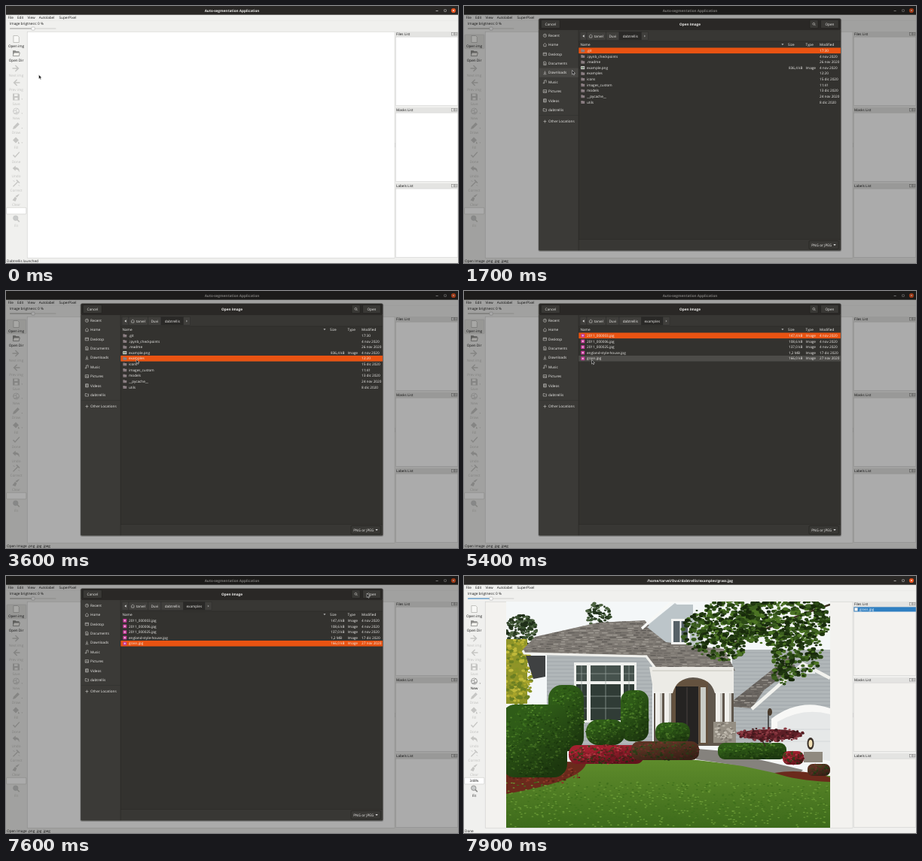
An HTML page that plays this animation: 600x342 px, repeating every 8 s.

```html
<!DOCTYPE html>
<html lang="en">
<head>
<meta charset="utf-8">
<title>Auto-segmentation Application</title>
<style>
html, body { margin: 0; width: 100%; height: 100%; overflow: hidden; background: #fff; }
svg { display: block; width: 100vw; height: 100vh; }
text {
  font: 500 4.66px "Open Sans", "Noto Sans", sans-serif;
  text-rendering: geometricPrecision;
  fill: #151515; white-space: pre;
}
text.b { font-weight: 700; }
.mid { text-anchor: middle; }
.dlg text { fill: #f2f1ef; }
.icon { fill: none; stroke: #8a8a88; stroke-width: .8; }
.icon .s { fill: #8a8a88; stroke: none; }
.off .icon { stroke: #c6c6c4; }
.off .icon .s { fill: #c6c6c4; }
.off text { fill: #c0c0be; }
.dlg .icon { stroke: #c9c8c5; stroke-width: .6; }
.paper { fill: #fff; }
.loaded .paper { fill: #f3f2ef; }
</style>
</head>
<body>
<svg id="stage" viewBox="0 0 600 342" preserveAspectRatio="none"></svg>
<script>
const LOOP = 8000, STEP = 100;
const ROW_TOP = 55.5, ROW_H = 7.62;

// ---------- markup helpers ----------
const rect = (x, y, w, h, fill, more = '') =>
  `<rect x="${x}" y="${y}" width="${w}" height="${h}" fill="${fill}" ${more}/>`;
const text = (x, y, s, more = '') => `<text x="${x}" y="${y}" ${more}>${s}</text>`;
const path = (d, fill, more = '') => `<path d="${d}" fill="${fill}" ${more}/>`;
const stroke = (d, color, width = 1, more = '') => path(d, 'none', `stroke="${color}" stroke-width="${width}" ${more}`);
const poly = (pts, fill, more = '') => `<polygon points="${pts}" fill="${fill}" ${more}/>`;
const oval = (x, y, rx, ry, fill) => `<ellipse cx="${x}" cy="${y}" rx="${rx}" ry="${ry}" fill="${fill}"/>`;
const group = (id, body, more = '') => `<g id="${id}" ${more}>${body}</g>`;
const icon = (x, y, body) => `<g class="icon" transform="translate(${x} ${y})">${body}</g>`;
const solid = d => `<path class="s" d="${d}"/>`;
const line = d => `<path d="${d}"/>`;

// ---------- main window ----------
const arrow = solid('M-5-.8H1L-1.6-3.4-.6-4.4 4 0-.6 4.4-1.6 3.4 1 .8H-5z');
const lens = '<circle cx="-.7" cy="-.8" r="3.2" fill="#c9cbcb"/>' +
  '<path stroke-width="1.6" d="M1.5 1.4L4.3 4.2"/>';
const tools = [
  ['Open img', 44, '<path fill="#f8f8f6" stroke="#b5b5b2" d="M-3.6-4.5H2L3.8-2.6V4.5H-3.6z"/>'],
  ['Open Dir', 63, solid('M-4.5-3.8H-1L0-2.8H4V-1H-3L-4.5 3z') + '<path fill="#f4f3ee" d="M-4.3 3.5L-3-1H4.8L3.8 3.5z"/>'],
  ['Next img', 83, arrow],
  ['Prev img', 102, `<g transform="scale(-1 1)">${arrow}</g>`],
  ['Save', 121, solid('M-4.5-4.5H3.2L4.5-3.2V4.5H-4.5zM-2.5-3.8V-1H2V-3.8zM-2 1V3.8H2V1z" fill-rule="evenodd'), 1],
  ['New', 140, '<circle r="4"/>' + line('M-4 0L0-1.5 2-3.6M0-1.5L1 4M-2.5 3L3.5 1'), 1],
  ['Draw', 159.5, solid('M-4.5 4.5L-3.6 1.2 2-4.4 4.4-2-1.2 3.6z'), 1],
  ['Fill', 179, solid('M-4.5-.5L-.5-4.5 3.5-.5-.5 3.5zM3 1L4.6 4.2H2.2z'), 1],
  ['Done', 198, '<path stroke-width="1.4" d="M-4 .2L-1.5 3 4.3-3.6"/>'],
  ['Undo', 217, solid('M-4.8-1L-.8-4.6V-2.3C3-2.3 4.8 0 4 4.2 3 1.5 1.5.5-.8.6V2.6z')],
  ['Correct', 236, solid('M-4.5 3.8L1.5-2.2 2.4-1.3-3.6 4.7zM1-5L5-1 3.8 0-.2-4z') + line('M-4-4L-2-2M3 2L4.5 3.5')],
  ['Clear', 255.5, solid('M4.4-4.8L1-.8-1-2.4 3.4-5zM-1.4-1.8L.8.4-1 4.4-5 3z')],
  ['Fit', 283, lens],
];

function toolbar() {
  return tools.map(([label, y, art, menu], i) => {
    const body = icon(13.5, y, art) +
      text(13.5, y + 10.8, label, 'class="mid"') +
      (menu ? icon(21.3, y + 3, solid('M-1-.6H1L0 .8z')) : '');
    return group('tool' + i, body, i > 1 ? 'class="off"' : '');
  }).join('');
}

function dock(y, label) {
  const boxes = [593, 597.3].map(x =>
    rect(x - 1.6, y + 1.7, 3.3, 3.3, 'none', 'stroke="#777" stroke-width=".5"')).join('');
  return rect(517, y, 83, 7, '#e4e4e2') + text(518, y + 5.1, label) + boxes +
    stroke(`M596.4 ${y + 2.5}l1.8 1.8m0-1.8l-1.8 1.8`, '#777', .5) +
    rect(517.2, y + 7.1, 82.6, 91.6, '', 'class="paper" stroke="#c9c9c7" stroke-width=".5"');
}

function appWindow() {
  return rect(0, 0, 600, 342, '#f0f0ee') +
    rect(0, 0, 600, 11.7, '#2a2826') +
    text(300, 7.7, 'Auto-segmentation Application', 'id="title" class="b mid"') +
    stroke('M570.6 6.5H573.6', '#ddd', .7) +
    rect(581.8, 4.9, 2.4, 2.4, 'none', 'stroke="#ddd" stroke-width=".5"') +
    oval(594, 6, 3.1, 3.1, '#e95420') +
    stroke('M592.9 4.9L595.1 7.1M595.1 4.9L592.9 7.1', '#fff', .6) +
    [[2.5, 'File'], [15, 'Edit'], [28.5, 'View'], [43.7, 'Autolabel'], [70.5, 'SuperPixel']]
      .map(([x, s]) => text(x, 17.2, s)).join('') +
    rect(0, 19.4, 600, .4, '#e0e0de') +
    text(5, 25.1, 'Image brigtness: 0 %') +
    rect(5, 29.5, 61.5, 1.1, '#cfcfcd', 'rx=".5"') +
    rect(5, 29.5, 31, 1.1, '#a9a9a7', 'id="level" rx=".5"') +
    rect(33.8, 28, 4.4, 4.2, '#fafafa', 'rx="1.2" stroke="#aaa" stroke-width=".5"') +
    rect(28.2, 34.2, 487.8, 301, '', 'class="paper" stroke="#c8c8c6" stroke-width=".5"') +
    rect(1, 38, 26, 18.8, '#e0e0de', 'id="hoverTool" rx="1" stroke="#c6c6c4" stroke-width=".5"') +
    toolbar() +
    rect(.6, 268.3, 26.2, 8.6, '#fff', 'stroke="#bdbdbb" stroke-width=".5" rx=".8"') +
    text(13.5, 274.4, '348%', 'id="zoom" class="mid"') +
    dock(34, 'Files List') + dock(135, 'Masks List') + dock(236, 'Labels List') +
    [183, 185, 187].map(y => oval(516.6, y, .4, .4, '#aaa')).join('') +
    text(1, 340.6, '', 'id="status"');
}

// ---------- house picture ----------
let seed = 7;
const rnd = () => (seed = (seed * 16807) % 2147483647) / 2147483647;
const pick = list => list[Math.floor(rnd() * list.length)];

// scatters small leaves inside an ellipse
function leaves(n, cx, cy, rx, ry, size, colors) {
  let out = '';
  for (let i = 0; i < n; i++) {
    const a = rnd() * 6.283, r = Math.sqrt(rnd()), s = size * (.5 + rnd() * .8);
    out += oval((cx + Math.cos(a) * r * rx).toFixed(1), (cy + Math.sin(a) * r * ry).toFixed(1),
      s.toFixed(1), (s * .7).toFixed(1), pick(colors));
  }
  return out;
}

const GREEN = ['#2f5c18', '#244b12', '#3f7420', '#558a2c', '#356519'];
const DARK = ['#1f3610', '#2c4a16', '#3d6020', '#182a0c', '#4c7424'];
const PINE = ['#2b3d22', '#3a5230', '#1f2f19', '#4d6341'];
const YELLOW = ['#a9a52b', '#8a9425', '#c0b93a', '#6c7f22'];
const RED = ['#a3202f', '#c93c4a', '#5f2a20', '#34501c', '#7c1d26'];
const RUST = ['#5c3424', '#3d5220', '#74352c', '#2c4219', '#4d3a22'];
const MAPLE = ['#5d1f26', '#7a2c36', '#41181c', '#8d3c44'];

function hedge(x, y, w, h, r, n, colors = GREEN) {
  return rect(x, y, w, h, colors[0], `rx="${r}"`) +
    leaves(n, x + w / 2, y + h / 2, w / 2, h / 2, 1.4, colors) +
    rect(x, y, w, h, 'url(#shade)', `rx="${r}"`);
}

// rows of short tiles in mixed greys
function shingles(x0, y0, x1, y1, clip) {
  let s = '';
  for (let y = y0; y < y1; y += 3)
    for (let x = x0 - rnd() * 8; x < x1; x += 9)
      s += rect(x.toFixed(1), y, (4 + rnd() * 5).toFixed(1), 1.3, pick(['#5f5b57', '#6d6964', '#a09b94', '#8d8881']));
  return `<g clip-path="url(#${clip})">${s}</g>`;
}

function siding(x, y, w, h) {
  let d = '';
  for (let k = y + 4; k < y + h; k += 5) d += `M${x} ${k}h${w}`;
  return rect(x, y, w, h, '#b1b7b9') + stroke(d, '#989fa2', .7);
}

function house() {
  const roof = '78,98 94,81 178,62 240,59 254,75 300,93 345,97 360,126 256,124 242,106 80,102';
  const wing = '357,166 430,108 440,120 398,152 382,176 357,174';
  let s = `<clipPath id="frame"><rect x="56" y="34" width="430" height="301"/></clipPath>
    <clipPath id="roof"><polygon points="${roof}"/></clipPath>
    <clipPath id="wing"><polygon points="${wing}"/></clipPath>
    <linearGradient id="shade" x2=".6" y2="1"><stop offset=".3" stop-opacity="0"/><stop offset="1" stop-opacity=".4"/></linearGradient>
    <linearGradient id="lawn" x2="0" y2="1"><stop stop-color="#5f8c2c"/><stop offset=".4" stop-color="#527f25"/>
    <stop offset="1" stop-color="#3d6a1b"/></linearGradient>`;
  s += rect(56, 34, 430, 301, '#f4f7f8');
  s += leaves(170, 76, 72, 21, 20, 2.4, PINE) + leaves(90, 179, 51, 17, 16, 2.2, PINE);
  s += rect(56, 84, 28, 86, '#8f9428') + leaves(190, 72, 128, 20, 46, 2.6, YELLOW);
  // walls and roofs
  s += siding(110, 100, 140, 125) + siding(356, 98, 130, 145);
  s += poly('243,66 280,36 312,60 318,98 262,90', '#c1c9cc');
  s += rect(274, 57, 28, 34, '#f5f6f5') + rect(277, 60, 10, 27, '#59666c') + rect(289, 60, 10, 27, '#59666c');
  s += poly(roof, '#7e7973') + shingles(78, 60, 362, 126, 'roof');
  s += poly('243,68 278,38 304,38 304,92 268,88', '#bcc5c9') + rect(275, 57, 25, 34, '#f3f4f2') +
    rect(278, 60, 8.5, 28, '#566167') + rect(288.5, 60, 8.5, 28, '#566167');
  s += stroke('M236 70L276 34H300', '#f7f8f6', 3.5);
  s += poly('82,106 108,106 108,134 92,137', '#3f4142');
  s += stroke('M78 99L80 103 242 107 255 124', '#f1f1ed', 3);
  s += poly(wing, '#6a6560') + shingles(355, 108, 442, 177, 'wing');
  s += stroke('M382 177L450 117 486 136', '#f2f2ee', 4.5);
  s += path('M454 127q6-13 12 0v3h-12z', '#e8ecec');
  // bay window
  s += rect(146, 115, 83, 80, '#eff0ed');
  for (const [x, w] of [[149, 14], [168, 40], [212, 14]]) {
    s += rect(x, 119, w, 21, '#46524d') + rect(x, 144, w, 48, '#303c36');
    s += stroke(`M${x + w / 2} 119v73M${x} 130h${w}M${x} 160h${w}M${x} 176h${w}`, '#9aa59f', .7);
  }
  // porch
  s += rect(252, 124, 106, 102, '#5f564c') + rect(276, 138, 48, 86, '#64523f');
  s += rect(281, 147, 30, 77, '#252322') + rect(314, 148, 7, 74, '#c9ccc6') + stroke('M296 148v76', '#4a4440');
  s += path('M246 121H358V156H333Q328 136 304 135 282 136 277 156H252z', '#ecebe6');
  s += stroke('M250 126H356', '#c3c2bb');
  for (const x of [254, 266, 334, 346]) s += rect(x, 154, 9, 56, '#f0efeb') + rect(x + 6, 156, 3, 54, '#c9c8c2');
  s += rect(331, 194, 30, 28, '#948e83') + leaves(60, 346, 208, 14, 13, 1.9, ['#b5afa4', '#7c766d', '#c6c1b6']);
  // garage
  s += path('M408 235V190Q445 162 486 176V248H408z', '#f8f8f6') + path('M416 236V194Q450 174 486 184V246z', '#e6e8e8');
  s += stroke('M416 204H486M416 220H486', '#d4d8d9');
  s += stroke('M404 180v24', '#333', 1.5) + oval(406, 181, 3, 5, '#4a3b2c');
  // ground
  s += path('M56 258Q200 236 310 245L486 266V335H56z', 'url(#lawn)');
  s += path('M56 258Q110 240 162 250 155 273 56 290z', '#6b2a1c') +
    leaves(110, 108, 265, 50, 12, 1.5, ['#8a3a26', '#551f15', '#7b3020']);
  s += path('M310 230L345 233 450 258 440 268 370 253 308 244z', '#85827d');
  s += path('M412 262Q450 256 486 268V274Q440 272 412 262z', '#6b2a1c');
  for (let i = 0; i < 900; i++) {
    const x = 56 + rnd() * 430, y = 274 + rnd() * 60;
    s += oval(x.toFixed(1), y.toFixed(1), 1.5, .7, i % 2 ? '#6a9a36' : '#3f6f1c');
  }
  // plants
  s += hedge(112, 145, 47, 88, 18, 420) + hedge(208, 152, 37, 68, 14, 270);
  s += hedge(162, 191, 52, 34, 16, 200) + hedge(254, 195, 46, 27, 12, 140);
  s += hedge(50, 171, 87, 97, 18, 750);
  s += hedge(139, 225, 100, 25, 11, 420, RED);
  s += hedge(222, 220, 90, 25, 10, 330, RUST);
  s += hedge(337, 222, 91, 22, 9, 260);
  s += oval(407, 211, 42, 7, MAPLE[0]) + leaves(200, 407, 211, 45, 9, 1.8, MAPLE) + stroke('M396 219l4 8', '#3b2a22', 1.5);
  s += rect(451, 234, 25, 14, '#8f897f') + oval(460, 223, 4.5, 8, '#3a3029') + oval(460, 223, 2.5, 5, '#f1dfb4');
  s += hedge(423, 233, 28, 18, 8, 120, RED) + hedge(456, 250, 30, 16, 7, 70, RUST);
  // overhanging branch
  s += stroke('M486 38Q420 60 352 92', '#3b3020', 2.5);
  for (const [x, y, rx, ry, n] of [[352, 62, 52, 30, 420], [425, 60, 64, 34, 620], [342, 95, 30, 18, 110],
    [442, 102, 34, 32, 210], [312, 74, 22, 26, 80], [425, 130, 14, 14, 40]])
    s += leaves(n, x, y, rx, ry, 2.9, DARK);
  return `<g clip-path="url(#frame)">${s}</g>`;
}

function openedFile() {
  return rect(517.4, 41.3, 82.4, 6.2, '#2f7fc1') +
    rect(518.4, 42.2, 4.2, 4.2, '#fff', 'stroke="#999" stroke-width=".4" rx=".5"') +
    text(525, 46, 'grass.jpg', 'style="fill:#fff"');
}

// ---------- file dialog ----------
const places = ['Recent', 'Home', 'Desktop', 'Documents', 'Downloads', 'Music', 'Pictures', 'Videos', 'dabtrellis'];
const placeArt = {
  Recent: '<circle r="2.1"/>' + line('M0-1.2V0H1'),
  Home: line('M-2.3 .2L0-2.2 2.3 .2M-1.6 0V2.1H1.6V0'),
  Desktop: line('M-2.2-1.8H2.2V1.8H-2.2zM-2.2-.8H2.2'),
  Documents: line('M-1.7-2.2H.8L1.7-1.3V2.2H-1.7zM-.8 0H.8M-.8 1H.8'),
  Downloads: line('M0-2.2V1M-1.3-.2L0 1.1 1.3-.2M-2 2.1H2'),
  Music: line('M-.8 1.4V-2L1.7-2.4V1M-.8 1.4a.7.6 0 1 1-1.4 0 .7.6 0 1 1 1.4 0'),
  Pictures: line('M-2.2-1.8H2.2V1.8H-2.2zM-2 1.5L-.5-.2 .8 1 1.4 .3 2.1 1.3'),
  Videos: line('M-1.8-2.1H1.8V2.1H-1.8zM-.9-2V2M.9-2V2'),
  dabtrellis: line('M-2.2-1.6H-.4L.2-1H2.2V1.8H-2.2z'),
};
const FOLDER = 'folder', PICTURE = 'picture', THUMB = 'thumb';
const rootFiles = [
  [FOLDER, '.git', '17:30'], [FOLDER, '.ipynb_checkpoints', '4 nov 2020'], [FOLDER, '.readme', '26 nov 2020'],
  [THUMB, 'example.png', '4 nov 2020', '836,4 kB'], [FOLDER, 'examples', '12:20'], [FOLDER, 'icons', '15 dic 2020'],
  [FOLDER, 'images_custom', '11:41'], [FOLDER, 'models', '13 dic 2020'], [FOLDER, '__pycache__', '24 nov 2020'],
  [FOLDER, 'utils', '8 dic 2020'],
];
const exampleFiles = [
  [PICTURE, '2011_000003.jpg', '4 nov 2020', '147,4 kB'], [PICTURE, '2011_000006.jpg', '4 nov 2020', '108,6 kB'],
  [PICTURE, '2011_000025.jpg', '4 nov 2020', '137,0 kB'], [PICTURE, 'england-style-house.jpg', '17 dic 2020', '1,2 MB'],
  [PICTURE, 'grass.jpg', '27 nov 2020', '166,0 kB'],
];
const fileArt = {
  folder: y => path(`M155.4 ${y - 2}h2l.6.7h2.2v3.4h-4.8z`, '#85797d') + rect(155.4, y - .5, 4.8, .5, '#9d9195'),
  picture: y => rect(155.3, y - 2.4, 4.9, 4.8, '#c53a9a', 'rx=".6"') + oval(157.7, y, 1.1, 1.1, '#f3c6e4'),
  thumb: y => rect(155.2, y - 2, 5, 4, '#e8e8e6') + rect(156, y - 1.2, 1.5, 2.4, '#5f7f58') + rect(158.2, y - 1.2, 1.2, 2.4, '#56585c'),
};

function fileList(files) {
  return files.map(([kind, name, date, size], i) => {
    const y = ROW_TOP + ROW_H * (i + .5);
    return fileArt[kind](y) + text(163, y + 1.7, name) + text(472, y + 1.7, date) +
      (size ? text(431, y + 1.7, size) + text(453.5, y + 1.7, 'Image') : '');
  }).join('');
}

const chip = (x, w, fill = '#403f3c') => rect(x, 34.3, w, 11, fill, 'stroke="#2b2a28" stroke-width=".5"');
const crumb = (x, s) => text(x, 41.6, s, 'class="mid"');

function crumbs(deep) {
  return chip(154, 9) + chip(163, 25.5) + chip(188.5, 17.5) +
    chip(206, 29.5, deep ? '#403f3c' : '#2a2927') + (deep ? chip(235.5, 28.5, '#2a2927') : '') +
    chip(deep ? 264 : 235.5, 9) +
    path('M159.6 38.3V41.7L157.4 40z', '#ddd') +
    path(deep ? 'M267.8 38.6V41.4L269.6 40z' : 'M239.2 38.6V41.4L241 40z', '#999') +
    icon(168.3, 40, placeArt.Home) + crumb(178.8, 'tarvel') + crumb(197.3, 'Duvi') +
    crumb(220.8, 'dabtrellis') + (deep ? crumb(249.8, 'examples') : '');
}

function button(x, w, label, y = 18.6) {
  return rect(x, y, w, 11, '#393835', 'rx="1.2" stroke="#1d1c1a" stroke-width=".5"') +
    (label ? text(x + w / 2, y + 7.2, label, 'class="mid"') : '');
}

function dialog() {
  const placeY = i => 39.3 + i * 12.36;
  return rect(98.4, 16.4, 402.8, 310.4, '#000', 'rx="2.5" opacity=".25"') +
    rect(99.2, 16.4, 401.2, 309.2, '#4b4a47', 'rx="2"') +
    rect(99.7, 16.9, 400.2, 15.3, '#2a2826', 'rx="1.8"') +
    rect(99.7, 32.1, 400.2, 293, '#33322f') +
    rect(99.7, 32.1, 52.3, 293, '#3b3a37') +
    rect(152, 32.1, 347.9, 14.8, '#383734') +
    rect(152, 310.6, 347.9, 14.5, '#383734') +
    rect(151.8, 32.1, .5, 293, '#242321') + rect(152, 46.8, 347.9, .4, '#242321') + rect(152, 310.4, 347.9, .4, '#242321') +
    button(102.3, 25, 'Cancel') + text(300, 25.9, 'Open Image', 'class="b mid"') +
    button(459, 11.2) + icon(464.6, 24.1, '<circle cx="-.3" cy="-.3" r="1.4"/>' + line('M.8 .8L2 2')) +
    button(473.5, 23.8, 'Open') +
    rect(100, placeY(4) - 6.1, 51.6, 12.2, '#484744', 'id="hoverPlace"') +
    places.map((p, i) => icon(107.4, placeY(i), placeArt[p]) + text(112, placeY(i) + 1.7, p)).join('') +
    rect(100, 145.4, 51.6, .4, '#2c2b29') +
    icon(107.4, 153.6, line('M-2 0H2M0-2V2')) + text(112, 155.3, 'Other Locations') +
    text(154.5, 53, 'Name') + path('M421.4 50.3H424.4L422.9 52.2z', '#bbb') +
    text(430, 53, 'Size') + text(453.5, 53, 'Type') + text(472, 53, 'Modified') +
    rect(152.3, 0, 347.6, ROW_H, '#4d4c49', 'id="hoverRow"') +
    rect(152.3, 0, 347.6, ROW_H, '#e95312', 'id="pickRow"') +
    group('rootView', crumbs(false) + fileList(rootFiles)) +
    group('exampleView', crumbs(true) + fileList(exampleFiles)) +
    button(458, 39.2, '', 312.4) + text(461.3, 319.6, 'PNG or JPEG') + path('M490.3 317H493.7L492 319z', '#ddd');
}

const pointer = path('M0 0V5.6L1.3 4.4 2.2 6.4 3.1 6 2.2 4.1H4z', '#111', 'stroke="#fff" stroke-width=".45"');

const stage = document.getElementById('stage');
stage.innerHTML = appWindow() + group('photo', house() + openedFile()) +
  rect(0, 0, 600, 342, '#000', 'id="dim"') + group('dialog', dialog(), 'class="dlg"') + group('pointer', pointer);

// ---------- timeline ----------
const el = {};
stage.querySelectorAll('[id]').forEach(n => el[n.id] = n);
const set = (node, values) => { for (const k in values) node.setAttribute(k, values[k]); };
const show = (node, on) => node.setAttribute('visibility', on ? 'visible' : 'hidden');

// pointer keys: time, x, y
const route = [
  [0, 43.5, 91.5], [300, 20, 69], [600, 20, 69], [900, 20, 57], [1300, 20, 57], [1500, 95, 75],
  [1700, 143.5, 85.5], [1900, 145, 86], [2800, 168, 91], [3100, 174, 98], [3200, 174, 98], [3300, 173, 91],
  [4300, 173, 91], [4500, 169.5, 91.5], [5800, 169.5, 91.5], [5900, 169.5, 90.8], [6000, 169.5, 90.8],
  [6200, 172, 83], [6400, 172, 83], [6700, 170, 90], [6900, 170, 90], [7400, 474, 27], [7600, 479, 23],
  [7700, 472, 52], [7900, 405, 217],
];

function pointerAt(t) {
  const i = route.findIndex(k => k[0] > t);
  if (i < 0) return route[route.length - 1].slice(1);
  const [t0, x0, y0] = route[i - 1], [t1, x1, y1] = route[i], p = (t - t0) / (t1 - t0);
  return [x0 + (x1 - x0) * p, y0 + (y1 - y0) * p];
}

function statusAt(t) {
  if (t >= 7800) return 'Done';
  if (t >= 900) return 'Open Image .png .jpg .jpeg';
  if (t >= 300) return 'Open directory and add all the images found in it .png .jpg .jpeg';
  return 'Dabtrellis launched';
}

function draw(t) {
  const [x, y] = pointerAt(t);
  const open = t >= 1100 && t < 7700, loaded = t >= 7800, inside = t >= 5400;

  set(el.pointer, { transform: `translate(${x} ${y})` });
  el.status.textContent = statusAt(t);
  el.title.textContent = loaded ? '/home/tarvel/Duvi/dabtrellis/examples/grass.jpg' : 'Auto-segmentation Application';
  el.title.style.fill = open ? '#b5b3b0' : '#f4f4f2';

  stage.classList.toggle('loaded', loaded);
  show(el.hoverTool, t >= 300 && t < 7700);
  set(el.hoverTool, { y: t < 800 ? 57.2 : 38 });
  set(el.tool5, { class: loaded ? '' : 'off' });
  set(el.tool12, { class: loaded ? '' : 'off' });
  set(el.level, { fill: loaded ? '#3a87c8' : '#a9a9a7' });
  show(el.zoom, loaded);
  show(el.photo, loaded);

  const dim = t < 1100 || loaded ? 0 : t < 7700 ? Math.min(1, (t - 1100) / 500) : .5;
  set(el.dim, { opacity: dim * .33 });

  show(el.dialog, open);
  const grow = t < 1200 ? .95 : 1;
  set(el.dialog, {
    opacity: t < 1200 ? .6 : 1,
    transform: `translate(${300 * (1 - grow)} ${171 * (1 - grow)}) scale(${grow})`,
  });
  const row = Math.floor((y - ROW_TOP) / ROW_H);
  const picked = inside ? (t >= 6900 ? 4 : 0) : (t >= 3600 ? 4 : 0);
  const rows = inside ? exampleFiles.length : rootFiles.length;
  set(el.hoverRow, { y: ROW_TOP + row * ROW_H });
  set(el.pickRow, { y: ROW_TOP + picked * ROW_H });
  show(el.hoverRow, open && x > 152 && row >= 0 && row < rows);
  show(el.pickRow, open);
  show(el.hoverPlace, open && x > 100 && x < 152 && y > 82.5 && y < 95);
  show(el.rootView, open && !inside);
  show(el.exampleView, open && inside);
}

const start = performance.now();
let shown = -1;
function tick() {
  const t = (performance.now() - start) % LOOP, step = Math.floor(t / STEP) * STEP;
  if (step !== shown) draw(shown = step);
  requestAnimationFrame(tick);
}
tick();
</script>
</body>
</html>
```
